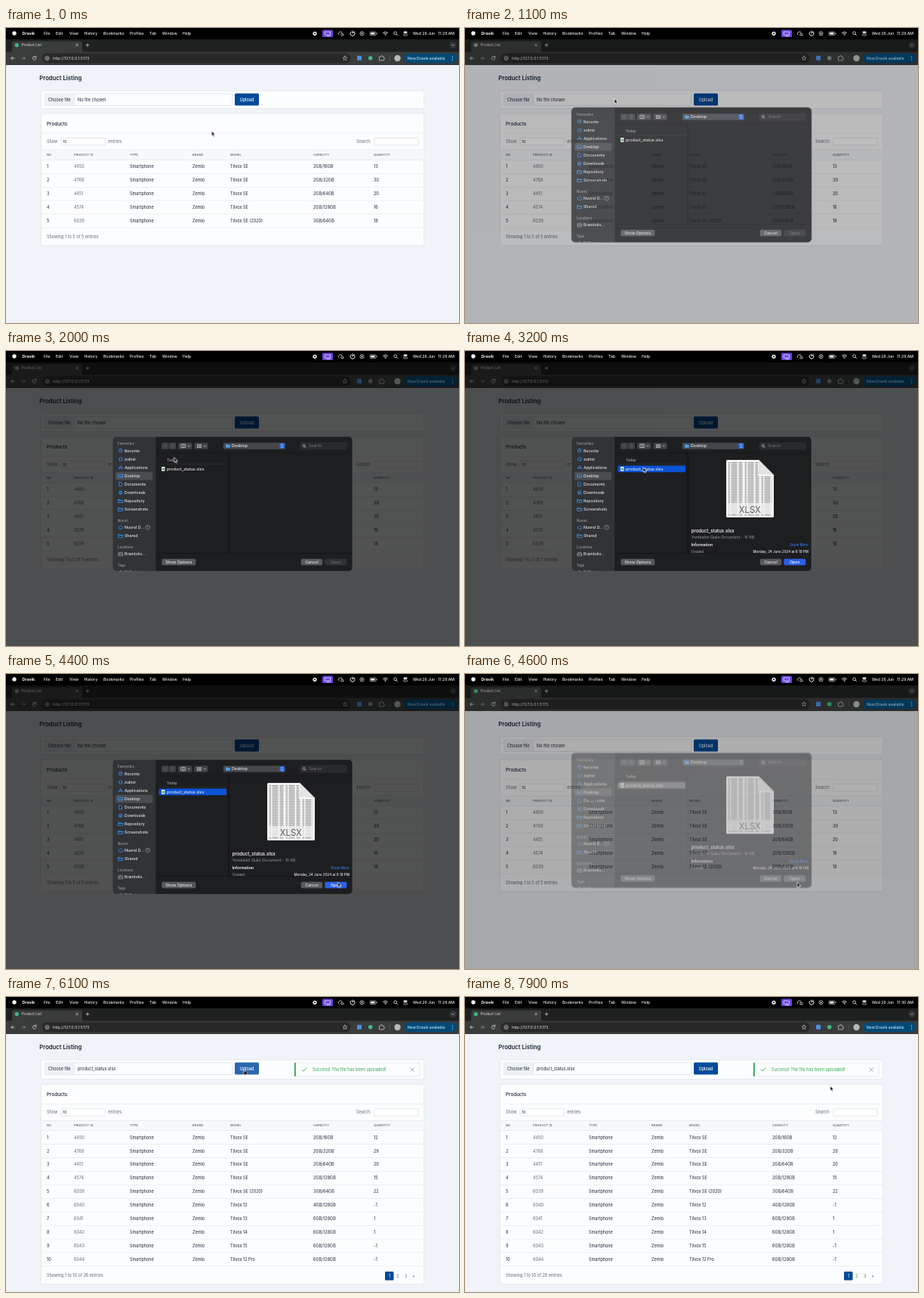
Animation, 600 px wide and 390 px high, one loop 8000 ms. Source, as an HTML page:

```html
<!DOCTYPE html>
<html lang="en">
<head>
<meta charset="utf-8">
<title>Product List</title>
<style>
html, body { margin: 0; width: 100%; height: 100%; overflow: hidden; background: #000; }
svg { display: block; width: 600px; height: 390px; font-family: Inter, "Open Sans", sans-serif; }
text { white-space: pre; }
.anim { animation: 8s step-end infinite; }
#dim { opacity: 0; animation-name: dim; }
#sheet { opacity: 0; animation-name: sheet; }
#pointer { animation-name: pointer; }

@keyframes dim {
  0% { opacity: 0 }
  12.5% { opacity: .1 }
  13.75% { opacity: .26 }
  15% { opacity: .41 }
  16.25% { opacity: .53 }
  17.5% { opacity: .62 }
  18.75% { opacity: .68 }
  56.25% { opacity: .5 }
  57.5% { opacity: .31 }
  58.75% { opacity: .16 }
  60% { opacity: .06 }
  61.25%, 100% { opacity: 0 }
}
@keyframes sheet {
  0% { opacity: 0; transform: translateY(-14px) }
  12.5% { opacity: .35; transform: translateY(-13px) }
  13.75% { opacity: .8; transform: translateY(-8px) }
  15% { opacity: 1; transform: translateY(-4.2px) }
  16.25% { opacity: 1; transform: translateY(-2px) }
  17.5% { opacity: 1; transform: translateY(-.6px) }
  18.75% { opacity: 1; transform: none }
  56.25% { opacity: .75; transform: translateY(-4px) }
  57.5% { opacity: .44; transform: translateY(-8.7px) }
  58.75% { opacity: .22; transform: translateY(-11px) }
  60% { opacity: .07; transform: translateY(-13px) }
  61.25%, 100% { opacity: 0; transform: translateY(-14px) }
}
@keyframes pointer {
  0% { transform: translate(272.5px, 136.5px); animation-timing-function: steps(4) }
  5% { transform: translate(244px, 119px); animation-timing-function: steps(5) }
  11.25% { transform: translate(198px, 93.7px) }
  20% { transform: translate(198px, 93.7px); animation-timing-function: steps(4) }
  25% { transform: translate(222.7px, 141px); animation-timing-function: steps(5) }
  31.25% { transform: translate(236px, 154px) }
  43.75% { transform: translate(236px, 154px); animation-timing-function: steps(5) }
  50% { transform: translate(372px, 244px); animation-timing-function: steps(4) }
  55% { transform: translate(439.5px, 275.5px) }
  57.5% { transform: translate(440px, 275.7px); animation-timing-function: steps(3) }
  61.25% { transform: translate(405px, 174px) }
  62.5% { transform: translate(405px, 174px); animation-timing-function: steps(8) }
  72.5% { transform: translate(315.3px, 95.5px) }
  96.25% { transform: translate(315.3px, 95.5px); animation-timing-function: steps(2) }
  98.75%, 100% { transform: translate(483.7px, 117.8px) }
}
</style>
</head>
<body>
<script>
const INK = '#182433', MUTED = '#626976', LINE = '#e1e5ea', BLUE = '#004a99', GREEN = '#2fa84f';
const rules = new Set();

// text centred vertically on cy
const T = (x, cy, size, str, fill = INK, weight = 400, extra = '') =>
  `<text x="${x}" y="${cy + size * .36}" font-size="${size}" fill="${fill}" font-weight="${weight}" ${extra}>${str}</text>`;
const R = (x, y, w, h, fill, r = 0, extra = '') =>
  `<rect x="${x}" y="${y}" width="${w}" height="${h}" rx="${r}" fill="${fill}" ${extra}/>`;
const C = (x, y, r, fill, extra = '') => `<circle cx="${x}" cy="${y}" r="${r}" fill="${fill}" ${extra}/>`;
const P = (d, stroke, w = .8, fill = 'none') =>
  `<path d="${d}" stroke="${stroke}" stroke-width="${w}" fill="${fill}" stroke-linecap="round" stroke-linejoin="round"/>`;
const G = (x, y, body) => `<g transform="translate(${x} ${y})">${body}</g>`;
const END = 'text-anchor="end"', MID = 'text-anchor="middle"';

// visible only between two moments in ms
function during(from, to, body) {
  const name = `on${from}to${to}`;
  rules.add(`@keyframes ${name}{0%{opacity:0}${from / 80}%{opacity:1}${to / 80}%{opacity:0}100%{opacity:0}}`);
  return `<g class="anim" style="animation-name:${name}">${body}</g>`;
}
const except = (from, to, body) => during(0, from, body) + during(to, 8000, body);

function menuBar() {
  const items = { File: 50, Edit: 66, View: 84, History: 103.5, Bookmarks: 129, Profiles: 164, Tab: 190, Window: 207, Help: 234 };
  const W = '#f2f2f2', y = 7.3;
  return R(0, 0, 600, 15, '#000') + C(11, 7, 2.7, W) + T(21.5, y, 5.3, 'Dravik', W, 700) +
    Object.entries(items).map(([s, x]) => T(x, y, 5.1, s, W, 500)).join('') +
    C(409, 7.3, 2.6, W) + C(409, 7.3, 1, '#000') +
    R(419, 2.5, 14, 9.5, '#6a45e0', 1.5) + P('M422.5 5h7v4h-7zM425 10.5h4', W, .7) +
    P('M441 9a1.6 1.6 0 0 1 .5-3 2 2 0 0 1 3.6 0M444 9.5a1.2 1.2 0 0 1 2-2 1.3 1.3 0 0 1 1 2z', W) +
    P('M457 5a3 3 0 1 0 4 0M459 4v3l2-2', W, 1) +
    C(471.5, 7.3, 2.6, 'none', `stroke="${W}" stroke-width=".7"`) + P('M470.8 6.2v2.2l1.8-1.1z', W, .3, W) +
    R(482, 5, 8, 4.6, 'none', 1.2, `stroke="${W}" stroke-width=".6"`) + R(483, 6, 5.5, 2.6, W, .5) + R(490.7, 6.4, .7, 1.8, W) +
    P('M499.5 6.3q3-2.6 6 0M500.8 7.8q1.7-1.4 3.4 0', W, .9) + C(502.5, 9.3, .7, W) +
    C(515.6, 6.8, 1.9, 'none', `stroke="${W}" stroke-width=".8"`) + P('M517 8.3l1.6 1.6', W) +
    R(526.5, 4.6, 5, 2.2, W, 1.1) + R(526.5, 7.8, 5, 2.2, 'none', 1.1, `stroke="${W}" stroke-width=".6"`) +
    T(539, y, 5.1, 'Wed 26 Jun', W, 500) +
    during(0, 7300, T(594, y, 5.1, '11:29 AM', W, 500, END)) +
    during(7300, 8000, T(594, y, 5.1, '11:30 AM', W, 500, END));
}

function browserBar() {
  const I = '#d5d7da';
  const dots = f => C(14.3, 22.6, 2.6, f) + C(482.7, 39.8, 2.8, f);
  return R(0, 15, 600, 17, '#1f2020') + R(0, 31.5, 600, 17.5, '#3a3b3b') +
    P('M6 32q2 0 2-2V20q0-2.5 2.5-2.5h88q2.5 0 2.5 2.5v10q0 2 2 2z', 'none', 0, '#3a3b3b') +
    T(20.5, 22.6, 4.7, 'Product List', '#e3e3e3') +
    P('M92.7 21.3l2.6 2.6m0-2.6l-2.6 2.6', I, .7) + P('M106 22.6h4m-2-2v4', I, .7) +
    C(592, 22.6, 4.6, '#343535') + P('M590.5 22l1.5 1.5 1.5-1.5', I, .7) +
    P('M11.3 40h-4.5m2-2l-2 2 2 2', I) + P('M20.8 40h4.5m-2-2l2 2-2 2', '#8b8d90') +
    P('M39.5 38.6a2.3 2.3 0 1 0 .3 1.9M39.8 37v1.8H38', I) +
    R(47.5, 33.5, 409, 13, '#282828', 6.5) + C(54.5, 40, 4.3, '#3c3c3c') +
    C(54.5, 40, 2.2, 'none', `stroke="${I}" stroke-width=".6"`) + P('M54.5 39.8v1.2', I, .6) +
    T(62, 40, 5.3, 'http://127.0.0.1:5173', '#e3e3e3') +
    P('M449 37l.9 1.9 2 .2-1.5 1.4.4 2-1.8-1-1.8 1 .4-2-1.5-1.4 2-.2z', I, .6) +
    R(465, 36.8, 6, 6, '#4a90e2', .8) +
    except(1000, 4500, dots('#41b883')) + during(1000, 4500, dots('#8d9092')) +
    P('M494.8 38h1.6q.2-1.6 1.2-1.6t1.2 1.6h1.4v1.5q1.4.2 1.4 1.1t-1.4 1.1v1.2h-5.4z', I, .7) +
    R(508, 36.5, .5, 7, '#5b6066') + C(518.5, 40, 4.2, '#b5b8bb') +
    R(527.5, 33.7, 69.5, 12.6, '#004a77', 6.3) + T(532, 40, 5, 'New Dravik available', '#c2e7ff', 500) +
    [37.7, 40, 42.3].map(y => C(591.5, y, .6, '#c2e7ff')).join('');
}

const card = (y, h) => R(46.3, y, 507.4, h, '#fcfdfe', 1.5, `stroke="${LINE}" stroke-width=".8"`);

function upload() {
  const button = f => R(303, 86.6, 32, 16, f, 1.6);
  const tick = P('M392 96.3l1.8 1.8 4.2-4.4', GREEN, .9);
  return during(0, 6100, card(83, 23.5)) + during(6100, 8000, card(83, 25.7)) +
    R(51.3, 86.9, 248.5, 15.6, '#fcfdfe', 1.5, 'stroke="#d9dee5" stroke-width=".7"') +
    R(51.6, 87.2, 38.6, 15, '#eef1f5', 1.2) + R(90, 87, .6, 15.5, '#d9dee5') +
    T(56, 94.8, 5.5, 'Choose file') +
    during(0, 4800, T(95, 94.8, 5.5, 'No file chosen')) +
    during(4800, 8000, T(95, 94.8, 5.5, 'product_status.xlsx')) +
    except(5700, 7800, button(BLUE)) + during(5700, 7800, button('#2c67ad')) +
    T(319, 94.8, 5.5, 'Upload', '#fff', 500, MID) +
    during(6100, 8000, R(382, 87, 166, 17.8, '#fcfdfe', 1, `stroke="${LINE}" stroke-width=".8"`) +
      R(382, 86.7, 1.8, 18.4, GREEN, .6) + tick + T(406, 96, 5.5, 'Success! The file has been uploaded!', GREEN) +
      P('M536 93.6l4.8 4.8m0-4.8l-4.8 4.8', '#7d8491', .7));
}

const cols = { NO: 54, 'PRODUCT ID': 90, TYPE: 164, BRAND: 247, MODEL: 297, CAPACITY: 407, QUANTITY: 487 };
const models = ['SE', 'SE', 'SE', 'SE', 'SE (2020)', '12', '13', '14', '15', '12 Pro'];
const ids = [4450, 4768, 4451, 4574, 6039, 6040, 6041, 6042, 6043, 6044];
const sizes = ['2GB/16GB', '2GB/32GB', '2GB/64GB', '2GB/128GB', '3GB/64GB', '4GB/128GB'];

// all heights are relative to the card top
function table(top, stock, footer, pager = '') {
  const end = 61.3 + stock.length * 17.9, xs = Object.values(cols);
  const field = x => R(x, 32.4, 58, 9.5, '#fff', 1, 'stroke="#d9dee5" stroke-width=".7"');
  const rule = y => R(46.5, y, 507, .6, LINE);
  const rows = stock.map((n, i) => {
    const cells = [i + 1, ids[i], 'Smartphone', 'Zemlo', 'Tilvox ' + models[i], sizes[i] || '6GB/128GB', n];
    const y = 70.3 + i * 17.9;
    return cells.map((s, k) => T(xs[k], y, 5.5, s, k == 1 ? MUTED : INK)).join('') + rule(y + 8.7);
  }).join('');
  return G(0, top, card(0, end + 24) + T(54, 13.3, 6.35, 'Products', INK, 500) + rule(25.8) +
    T(54, 37, 5.5, 'Show', MUTED) + field(73) + T(75.2, 37.2, 4.9, '10') + T(135.3, 37, 5.5, 'entries', MUTED) +
    T(464, 37, 5.5, 'Search:', MUTED) + field(488) +
    R(46.6, 48, 506.8, 13, '#f6f8fb') + rule(47.8) + rule(61) +
    Object.entries(cols).map(([s, x]) => T(x, 54.7, 3.9, s, MUTED, 600, 'letter-spacing=".16"')).join('') +
    rows + T(54, end + 12.3, 5.5, footer, MUTED) + pager);
}

function pager() {
  return R(502, 247.7, 11.5, 11.5, BLUE, 1.3) +
    ['1', '2', '3', '»'].map((s, i) => T([507.8, 518.8, 529.6, 540][i], 253.5, 5.5, s, i ? MUTED : '#fff', 400, MID)).join('');
}

function sidebar() {
  const folder = 'M-2.8-1.9h2l.6.7h3v3.3h-5.6zM-2.8-.6h5.6';
  const cloud = 'M-1.7 1.8a1.5 1.5 0 0 1 0-2.9 2 2 0 0 1 3.6 0 1.5 1.5 0 0 1 0 2.9z';
  const items = [
    [131.7, 'Recents', 'M-2.4 0a2.4 2.4 0 1 0 4.8 0 2.4 2.4 0 1 0-4.8 0M0-1.4v1.5h1'],
    [142.8, 'zulmir', 'M-2.6-.2l2.6-2.3 2.6 2.3M-1.9-.6v2.8h3.8v-2.8'],
    [153.9, 'Applications', 'M-2.2 2l2.2-4.4 2.2 4.4M-2.8.7h5.6'],
    [165, 'Desktop', 'M-2.7-2h5.4v4h-5.4zM-2.7 1h5.4'],
    [176.1, 'Documents', 'M-1.8-2.5h2.3l1.3 1.3v3.7h-3.6z'],
    [187.2, 'Downloads', 'M-2.4 0a2.4 2.4 0 1 0 4.8 0 2.4 2.4 0 1 0-4.8 0M0-1.3v2.5m-1-1l1 1 1-1'],
    [198.3, 'Repository', folder], [209.4, 'Screenshots', folder],
    [233.4, 'Nuvrel D…', cloud], [244.5, 'Shared', folder],
    [268.3, 'Bramtolix…', 'M-2.8 2v-2l1-2h3.6l1 2v2zM-2.8 0h5.6']
  ];
  const heads = [[122.9, 'Favourites'], [224.5, 'Nuvrel'], [259.5, 'Locations'], [283.6, 'Tags']];
  return R(141, 113, 57.3, 179, '#313336') + R(145, 159.7, 49.3, 10.8, '#4b4d51', 2) +
    heads.map(([y, s]) => T(148, y, 4.3, s, '#8f9194', 600)).join('') +
    items.map(([y, s, d]) => G(151.8, y, P(d, y > 260 ? '#a9abae' : '#3d93f5', .75)) + T(157, y, 5.2, s, '#e6e6e6', 500)).join('') +
    C(187.6, 233.2, 2.8, 'none', 'stroke="#9a9c9f" stroke-width=".7"') + P('M187.6 231.6v1.6', '#9a9c9f', .7) +
    C(151.8, 292, 1.8, '#9a9c9f') + T(157, 292.3, 5.2, 'Yellow', '#e6e6e6', 500);
}

function paper() {
  let lines = '';
  for (let y = 147.5; y < 218; y += 2.1) {
    const w = y < 165 ? 388 : 407;
    const tone = y > 202 && y < 215 ? '#d4d4d4' : '#8b8b8b';
    lines += `<path d="M348.5 ${y}H${w}" stroke="${tone}" stroke-width="1" stroke-dasharray="2.5 1.5 8 2 5 3"/>`;
  }
  return P('M347.5 144H389L409 164V218.5q0 1.5-1.5 1.5h-60q-1.5 0-1.5-1.5v-73q0-1.5 1.5-1.5z', 'none', 0, '#f4f4f4') + lines +
    P('M389 144q2 8-.5 18 11-1 20.5 2z', '#c9c9c9', .4, '#e4e4e4') +
    T(377.3, 209.5, 11.4, 'XLSX', '#5f5f5f', 400, MID);
}

function sheet() {
  const W = '#e9e9e9', gray = '#9a9b9d';
  const btn = (x, w, f, s, c) => R(x, 274.7, w, 8.6, f, 1.8) + T(x + w / 2, 279, 5.3, s, c, 500, MID);
  const tool = (x, w) => R(x, 121.2, w, 8.6, '#404245', 1.6);
  const arrows = P('M364.4 124.6l1.2-1.3 1.2 1.3m-2.4 1.9l1.2 1.3 1.2-1.3', '#fff', .7);
  const grid = x => [0, 2.2, 4.4].map(d => R(x + d, 123.6, 1.5, 1.5, W) + R(x + d, 126.2, 1.5, 1.5, W)).join('');
  const row = f => R(202.5, 151.6, 89.5, 8.7, f, 1.6);
  const file = R(206, 153, 4.4, 5.8, '#f4f4f4', .5) + R(206.8, 155, 2.8, 2.4, '#4f9d69');
  return `<clipPath id="frame">${R(141, 113, 318, 178.3, '#000', 5)}</clipPath><g clip-path="url(#frame)">` +
    R(141, 113, 318, 179, '#1d1e20') + sidebar() +
    tool(206, 9.3) + tool(215.8, 9.3) + P('M211.3 124l-1.4 1.5 1.4 1.5M219.8 124l1.4 1.5-1.4 1.5', '#797b7e', .7) +
    tool(228, 18.5) + R(231.7, 123.3, 6, 4.4, 'none', .5, `stroke="${W}" stroke-width=".6"`) + P('M233.7 123.3v4.4m2-4.4v4.4', W, .5) +
    P('M240.8 125l1.3 1.3 1.3-1.3', W, .6) + tool(249.5, 18) + grid(253) + P('M262 125l1.3 1.3 1.3-1.3', W, .6) +
    R(287.8, 121.2, 82, 8.6, '#45474b', 1.6) + G(294, 125.5, P('M-2.6-1.9h2l.6.7h2.6v3.2h-5.2z', '#4aa3f5', .4, '#4aa3f5')) +
    T(299, 125.5, 5.3, 'Desktop', W, 500) + during(0, 4500, R(362.2, 121.9, 6.8, 7.2, '#2a66de', 1.4)) + arrows +
    R(390, 121.2, 61, 8.6, '#28292c', 1.8, 'stroke="#3c3e41" stroke-width=".5"') +
    C(394.7, 125.1, 1.6, 'none', `stroke="${W}" stroke-width=".6"`) + P('M395.9 126.4l1.3 1.3', W, .6) + T(401, 125.6, 5.2, 'Search', '#77797c') +
    T(213, 143.9, 4.5, 'Today', gray, 600) + R(202.5, 149, 89.5, .5, '#36383b') +
    R(294.8, 135, .7, 132.5, '#08090a') + R(198.3, 134.6, 261, .5, '#111214') + R(198.3, 267.3, 261, .6, '#101113') +
    during(2700, 4500, row('#0c53d8')) + during(4500, 5000, row('#6a6c6f')) +
    file + T(213, 156, 5.3, 'product_status.xlsx', W, 500) +
    during(2900, 5000, paper() + T(299.7, 238.2, 6, 'product_status.xlsx', W, 600) +
      T(299.7, 246.3, 5.2, 'Yombalist Quilo Document - 10 KB', gray) +
      T(299.7, 256, 5, 'Information', W, 700) + T(454.8, 256.2, 4.6, 'Show More', '#2f7bf0', 500, END) +
      T(299.7, 265, 4.3, 'Created', gray, 500) + T(454.8, 265, 4.5, 'Monday, 24 June 2024 at 6:19 PM', W, 500, END)) +
    btn(206.3, 45, '#56585b', 'Show Options', W) + btn(390.7, 28.5, '#56585b', 'Cancel', W) +
    during(0, 2700, btn(422.3, 29, '#303234', 'Open', '#6c6e71')) +
    during(2700, 4500, btn(422.3, 29, '#2a60e4', 'Open', '#fff')) +
    during(4500, 5000, btn(422.3, 29, '#56585b', 'Open', W)) +
    '</g>' + R(141, 113, 318, 178.3, 'none', 5, 'stroke="#5c5e61" stroke-width=".6"');
}

function pointer() {
  const arrow = P('M0 0V6.2L1.4 4.9 2.4 7.2 3.5 6.7 2.5 4.5H4.4z', '#fff', .7, '#000');
  const hand = P('M0 .3q.8-.6 1 .4v2l2.4.6q.9.3.7 1.3l-.5 2.4H.2L-1.5 4.4q0-1 1-.5L0 4.3z', '#fff', .6, '#000');
  return except(5700, 7800, arrow) + during(5700, 7800, hand);
}

const layer = (id, body) => `<g id="${id}" class="anim">${body}</g>`;
const scene = R(0, 49, 600, 341, '#f0f3f8') + browserBar() +
  T(44.3, 66, 7.7, 'Product Listing', INK, 600) + upload() +
  during(0, 6100, table(113, [13, 30, 20, 16, 18], 'Showing 1 to 5 of 5 entries')) +
  during(6100, 8000, table(115.4, [12, 29, 20, 15, 22, -1, 1, 1, -1, -1], 'Showing 1 to 10 of 26 entries', pager())) +
  layer('dim', R(0, 15, 600, 34, '#000', 0, 'opacity=".8"') + R(0, 49, 600, 341, '#000')) +
  menuBar() + layer('sheet', sheet()) + layer('pointer', pointer());

const style = document.createElement('style');
style.textContent = [...rules].join('\n');
document.head.append(style);
document.body.innerHTML = `<svg viewBox="0 0 600 390">${scene}</svg>`;
</script>
</body>
</html>
```
